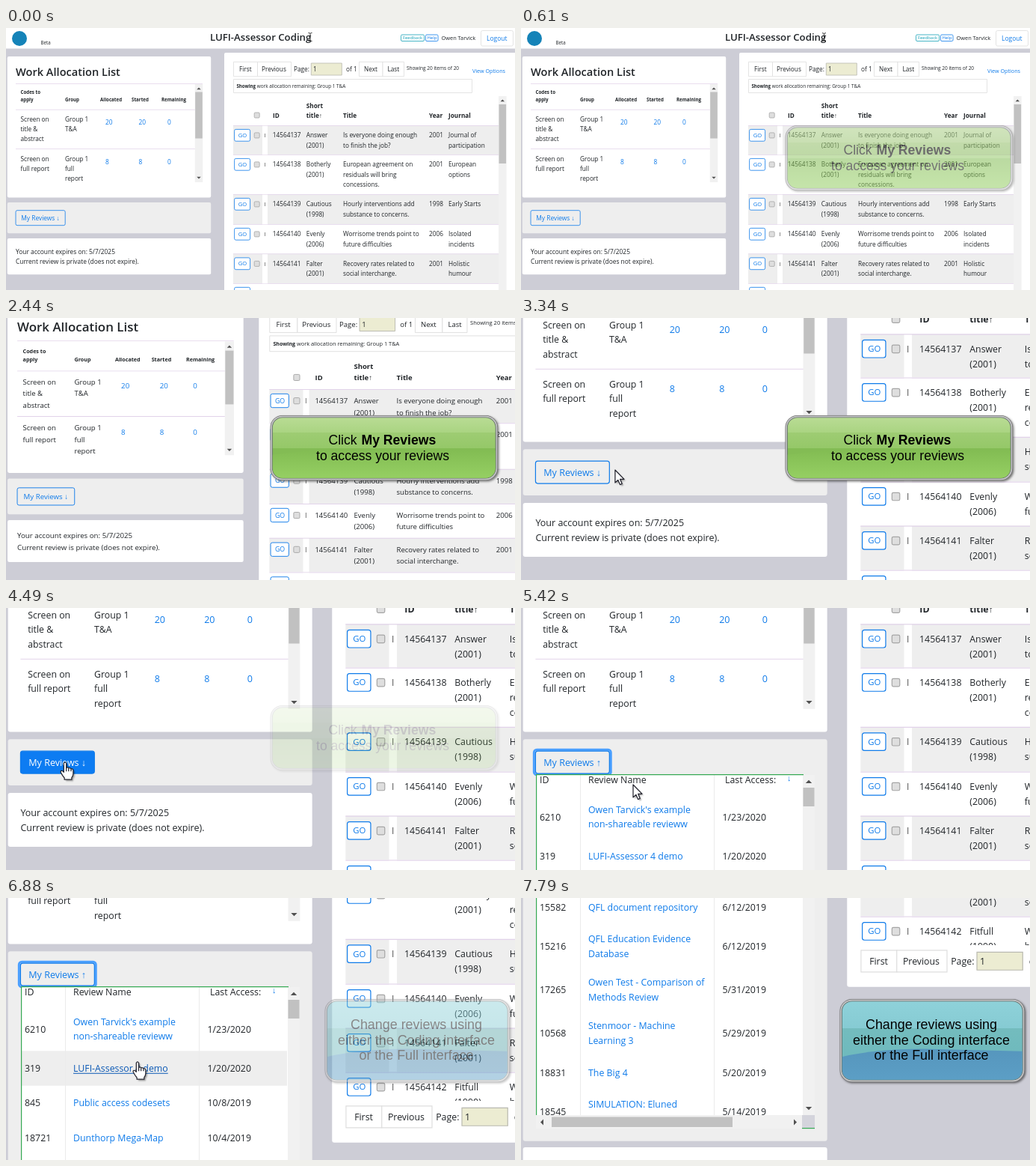
An HTML page with a canvas that plays this animation: 681x350 px, repeating every 8000 ms.

```html
<!DOCTYPE html>
<html lang="en">
<head>
<meta charset="utf-8">
<title>Opening the review list</title>
<style>
  html, body { margin: 0; width: 100%; height: 100%; overflow: hidden; background: #cdcdd6; }
  canvas { display: block; }
</style>
</head>
<body>
<canvas id="stage" width="681" height="350"></canvas>
<script>
const W = 681, H = 350, LOOP = 8000, ZOOM = 1.494, NOTCH = 104;
const INK = '#212529', BLUE = '#0f7bea', BACK = '#cdcdd6', PALE = '#eeeeee', LILAC = '#e2d3ea';
let ctx = document.getElementById('stage').getContext('2d');

const ramp = (t, a, b) => Math.min(1, Math.max(0, (t - a) / (b - a)));
const ease = (t, a, b) => { const p = ramp(t, a, b); return p * p * (3 - 2 * p); };

function text(str, x, y, size = 8.25, color = INK, weight = 400) {
  ctx.font = `${weight} ${size}px "Open Sans", sans-serif`;
  ctx.fillStyle = color;
  ctx.fillText(str, x, y + size * 0.36);
  return ctx.measureText(str).width;
}

function lines(list, x, y, step, size, color, weight) {
  list.forEach((s, i) => text(s, x, y + i * step, size, color, weight));
}

function box(x, y, w, h, fill, stroke, r = 0, lw = 0.8) {
  ctx.beginPath();
  ctx.roundRect(x, y, w, h, r);
  if (fill) { ctx.fillStyle = fill; ctx.fill(); }
  if (stroke) { ctx.strokeStyle = stroke; ctx.lineWidth = lw; ctx.stroke(); }
}

function clipped(x, y, w, h, draw, r = 0) {
  ctx.save();
  ctx.beginPath();
  ctx.roundRect(x, y, w, h, r);
  ctx.clip();
  draw();
  ctx.restore();
}

function triangle(x, y, r, angle, color = '#505050') {
  ctx.save();
  ctx.translate(x, y);
  ctx.rotate(angle);
  ctx.beginPath();
  ctx.moveTo(-r, r / 2);
  ctx.lineTo(r, r / 2);
  ctx.lineTo(0, -r / 2);
  ctx.fillStyle = color;
  ctx.fill();
  ctx.restore();
}

function scrollbar(x, y, w, h, thumbY, thumbH) {
  box(x, y, w, h, '#f1f1f1');
  box(x + 0.5, thumbY, w - 1, thumbH, '#c1c1c1');
  triangle(x + w / 2, y + w * 0.55, w * 0.26, 0);
  triangle(x + w / 2, y + h - w * 0.55, w * 0.26, Math.PI);
}

// ---- page ----

function header() {
  box(0, 0, W, 27.5, '#fff');
  ctx.beginPath();
  ctx.arc(18, 14, 10, 0, 7);
  ctx.fillStyle = '#1583b8';
  ctx.fill();
  text('Beta', 46.5, 20, 6.2);
  text('LUFI-Assessor Coding', 273, 12.5, 13.2, INK, 600);
  box(528.5, 9, 31, 8.5, '#fff', '#17a2b8', 1.5);
  text('Feedback', 531, 13.2, 5.9, '#17a2b8');
  box(561.5, 9, 16.5, 8.5, '#fff', BLUE, 1.5);
  text('Help', 563.5, 13.2, 5.9, BLUE);
  text('Owen Tarvick', 582.5, 13.5, 7.4);
  box(635.5, 3.5, 43, 20.5, '#fff', '#dddddd', 2);
  text('Logout', 643, 13.5, 8.5, BLUE);
}

function allocations() {
  box(1.8, 38, 272.4, 188.5, '#fff', null, 2);
  text('Work Allocation List', 13, 58.5, 14.6, INK, 600);
  box(13, 74, 250, 0.7, LILAC);
  lines(['Codes to', 'apply'], 19.5, 86, 10, 6.2, INK, 700);
  [['Group', 79], ['Allocated', 126], ['Started', 168], ['Remaining', 208]]
    .forEach(([s, x]) => text(s, x, 96, 6.2, INK, 700));
  box(13, 108.7, 240, 0.8, LILAC);
  box(13, 161, 240, 0.8, LILAC);
  const row = (y, code, group, count) => {
    lines(code, 19.5, y, 13.2);
    lines(group, 79, y, 13.2);
    [[count, 133], [count, 177.5], ['0', 216]].forEach(([s, x]) => text(s, x, y + 4.4, 8.4, BLUE));
  };
  row(121.9, ['Screen on', 'title &', 'abstract'], ['Group 1', 'T&A'], '20');
  row(174.8, ['Screen on', 'full report'], ['Group 1', 'full', 'report'], '8');
  scrollbar(252.7, 75, 10.6, 131, 85.5, 62);
}

function reviewsPanel(open, hover) {
  box(1.8, 233, 272.4, open ? 309 : 41.3, PALE, null, 2);
  if (open) box(11.6, 242.4, 68.9, 22.5, null, '#4ba0ff', 2.5, 2);
  box(13, 243.7, 66.2, 20, hover ? '#0d7cf2' : null, BLUE, 2);
  text('My Reviews ' + (open ? '↑' : '↓'), 20.3, 253.8, 8.4, hover ? '#fff' : BLUE);
}

function account(open) {
  const y = open ? 266.4 : 0;
  box(1.8, 281 + y, 272.4, 48.3, '#fff', null, 2);
  text('Your account expires on: 5/7/2025', 13, 299 + y, 8.38);
  text('Current review is private (does not expire).', 13, 312.2 + y, 8.38);
}

const papers = [
  [130, ['Answer', '(2001)'], ['Is everyone doing enough', 'to finish the job?'], '2001', ['Journal of', 'participation']],
  [169, ['Botherly', '(2001)'], ['European agreement on', 'residuals will bring', 'concessions.'], '2001', ['European', 'options']],
  [222, ['Cautious', '(1998)'], ['Hourly interventions add', 'substance to concerns.'], '1998', ['Early Starts']],
  [262, ['Evenly', '(2006)'], ['Worrisome trends point to', 'future difficulties'], '2006', ['Isolated', 'incidents']],
  [301.5, ['Falter', '(2001)'], ['Recovery rates related to', 'social interchange.'], '2001', ['Holistic', 'humour']],
  [341, ['Fitfull', '(1990)'], ['Weekly patterns of', 'household change.'], '1990', ['Modern', 'habits']],
  [381]
];

function checkbox(y) {
  box(332.2, y - 3.5, 7, 7, '#dedede', '#a5a5a5', 1.2);
}

function pager(y) {
  box(304.5, y - 9.7, 32, 19.4, '#fff', '#dedede');
  box(336.5, y - 9.7, 45, 19.4, '#fff', '#dedede');
  text('First', 312, y);
  text('Previous', 342, y);
  text('Page:', 385, y);
  box(408.3, y - 8, 41, 16, '#ececd2', '#b9b9b0');
  text('1', 411, y);
  text('of 1', 455, y);
  box(472.5, y - 9.7, 31.5, 19.4, '#fff', '#dedede');
  box(504, y - 9.7, 28.5, 19.4, '#fff', '#dedede');
  text('Next', 479, y);
  text('Last', 510.5, y);
  text('Showing 20 items of 20', 536, y - 1.5, 6.5);
}

function paperRow([top, name, title, year, journal], i) {
  const y = top + 13.4, h = papers[i + 1][0] - top;
  box(304, top, 355, h, i % 2 ? '#fff' : PALE);
  box(304, top, 355, 0.8, LILAC);
  box(343, top + 0.8, 7, h - 0.8, '#fff');
  box(305.6, y - 8, 21, 15.8, '#fff', BLUE, 2);
  text('GO', 310.7, y - 0.2, 7.6, BLUE);
  checkbox(y);
  text('I', 345.3, y, 8, '#555');
  text(String(14564137 + i), 356.8, y);
  lines(name, 401.8, y, 13.35);
  lines(title, 451, y, 13.35);
  text(year, 566, y);
  lines(journal, 592, y, 13.35);
}

function papersPanel() {
  box(292, 33, 400, 371, '#fff', null, 2);
  pager(55);
  text('View Options', 624, 57, 7.2, BLUE);
  box(304.5, 68.5, 319, 18, '#fff', '#dedede');
  const w = text('Showing', 308.5, 77.5, 6.1, INK, 700);
  text(' work allocation remaining: Group 1 T&A', 308.5 + w, 77.5, 6.4);
  clipped(304, 91, 366, 275.7, () => {
    checkbox(116.5);
    text('Short', 401.8, 104, 8.2, INK, 700);
    [['ID', 357], ['title↑', 401.8], ['Title', 451], ['Year', 566], ['Journal', 592]]
      .forEach(([s, x]) => text(s, x, 117, 8.2, INK, 700));
    papers.slice(0, -1).forEach(paperRow);
    scrollbar(659, 91, 10.6, 275.7, 102, 79);
  });
  pager(381);
}

// ---- review list, laid out in zoomed units ----

const reviews = [
  ['6210', ["Owen Tarvick's example", 'non-shareable revieww'], '1/23/2020'],
  ['319', ['LUFI-Assessor 4 demo'], '1/20/2020'],
  ['845', ['Public access codesets'], '10/8/2019'],
  ['18721', ['Dunthorp Mega-Map'], '10/4/2019'],
  ['16034', ['Rapid scoping of', 'school meals'], '7/8/2019'],
  ['15582', ['QFL document repository'], '6/12/2019'],
  ['15216', ['QFL Education Evidence', 'Database'], '6/12/2019'],
  ['17265', ['Owen Test - Comparison of', 'Methods Review'], '5/31/2019'],
  ['10568', ['Stenmoor - Machine', 'Learning 3'], '5/29/2019'],
  ['18831', ['The Big 4'], '5/20/2019'],
  ['18545', ['SIMULATION: Eluned', 'workload'], '5/14/2019'],
  ['17902', ['Pilot screening'], '5/13/2019']
];
let nextTop = 146;
const reviewRows = reviews.map(([id, name, date]) => {
  const top = nextTop, h = name.length > 1 ? 58.2 : 46.5;
  nextTop += h;
  return { id, name, date, top, h };
});

function reviewRow({ id, name, date, top, h }, hovered, onLink) {
  const y = top + h / 2, size = 12.35;
  if (hovered) box(21, top, 355, h, PALE);
  text(id, 25, y, size);
  text(date, 269.5, y, size);
  name.forEach((s, i) => {
    const ly = y + (i - (name.length - 1) / 2) * 19.7;
    const w = text(s, 90, ly, size, onLink ? '#0a58b5' : BLUE);
    if (onLink) box(90, ly + 6.3, w, 1, '#0a58b5');
  });
}

function reviewList(offset, hovered, onLink) {
  ctx.save();
  ctx.scale(1 / ZOOM, 1 / ZOOM);
  ctx.translate(0, NOTCH + H * (ZOOM - 1));
  clipped(20, 118, 373, 380, () => {
    box(20, 118, 358, 380, '#fff');
    ctx.save();
    ctx.translate(0, -offset);
    [['ID', 25], ['Review Name', 90], ['Last Access:', 273]].forEach(([s, x]) => text(s, x, 126, 12.35));
    text('↓', 356, 123, 11, BLUE);
    reviewRows.forEach(r => reviewRow(r, r === hovered, onLink && r === hovered));
    box(79, 118, 1, 700, '#ebebeb');
    box(258, 118, 1, 700, '#ebebeb');
    ctx.restore();
    scrollbar(377, 119, 16, 379, 136 + offset * 0.063, 25);
  });
  box(20, 118, 1.2, 380, '#35a853');
  box(20, 118, 358, 1.2, '#35a853');
  box(20, 498, 357, 18, '#f1f1f1');
  box(41, 500.5, 242, 13.5, '#c1c1c1');
  triangle(28, 507.5, 4, -Math.PI / 2);
  triangle(367, 507.5, 4, Math.PI / 2);
  box(376, 498, 17, 17, '#d4d4dc');
  box(376, 515, 17, 1.2, '#35a853');
  ctx.restore();
}

// ---- pointer ----

const zoomed = (t, x, y) => [t, x / ZOOM, H - (H - y) / ZOOM];
const path = [
  [0, 407, 12], [500, 407, 12], [1000, 400, 13], [1450, 341, 15], [1810, 281, 14], [2500, 281, 14],
  zoomed(3340, 126, 203), zoomed(3560, 110, 210), zoomed(3830, 84, 213), zoomed(4250, 79, 206),
  zoomed(4800, 79, 206), zoomed(5420, 150, 236), zoomed(5600, 150, 236), zoomed(6060, 194, 196),
  zoomed(6520, 194, 196), zoomed(6960, 172, 224), zoomed(7460, 172, 224), zoomed(7600, 520, 190),
  zoomed(LOOP, 520, 190)
];

function pointerAt(t) {
  const i = path.findIndex(k => k[0] > t);
  const [a, b] = [path[i - 1], path[i]], p = ramp(t, a[0], b[0]);
  return { x: a[1] + (b[1] - a[1]) * p, y: a[2] + (b[2] - a[2]) * p };
}

const arrow = new Path2D('M0 0V16.5L3.8 13L6.3 19L9 17.9L6.5 12H11.7Z');
const hand = new Path2D('M-1.6 1.2Q0-1.4 1.6 1.2V7.2Q3.6 6 4.6 7.8Q6.8 6.8 7.8 8.8Q10 8 10.6 10.4V15Q10.4 18 8.6 20V22.5H-.8V20.4Q-3 18-5.6 13.2Q-6 10.2-3.4 11.2L-1.6 13Z');
const fingers = new Path2D('M1.6 7V12M4.6 8V12M7.8 9V12');

function pointer({ x, y }, kind) {
  ctx.save();
  ctx.translate(x, y);
  ctx.lineJoin = 'round';
  if (kind === 'beam') {
    ctx.strokeStyle = '#222';
    ctx.lineWidth = 0.9;
    ctx.stroke(new Path2D('M-2.5-5.5Q0-5.5 0-4.5Q0-5.5 2.5-5.5M0-4.5V4.5M-2.5 5.5Q0 5.5 0 4.5Q0 5.5 2.5 5.5'));
  } else {
    ctx.scale(1.03 / ZOOM, 1.03 / ZOOM);
    const shape = kind === 'hand' ? hand : arrow;
    ctx.fillStyle = '#fff';
    ctx.strokeStyle = '#23232d';
    ctx.lineWidth = 1.2;
    ctx.shadowColor = 'rgba(0,0,0,.35)';
    ctx.shadowBlur = 2;
    ctx.shadowOffsetX = ctx.shadowOffsetY = 2;
    ctx.fill(shape);
    ctx.shadowColor = 'transparent';
    ctx.stroke(shape);
    if (kind === 'hand') ctx.stroke(fingers);
  }
  ctx.restore();
}

// ---- callouts, drawn once so that each fades as a single layer ----

function layer(paint) {
  const page = ctx, canvas = document.createElement('canvas');
  canvas.width = W;
  canvas.height = H;
  ctx = canvas.getContext('2d');
  paint();
  ctx = page;
  return canvas;
}

function shade(top, bottom, stops) {
  const g = ctx.createLinearGradient(0, top, 0, bottom);
  stops.forEach(([p, c]) => g.addColorStop(p, c));
  return g;
}

// The lowest band has a crest: it starts lower at the left edge.
function bubble(x, y, w, h, stops, wave, low) {
  ctx.shadowColor = 'rgba(0,0,0,.5)';
  ctx.shadowBlur = 3;
  ctx.shadowOffsetX = ctx.shadowOffsetY = 1.5;
  box(x, y, w, h, '#777', null, 16);
  ctx.shadowColor = 'transparent';
  box(x + 0.8, y + 0.8, w - 1.6, h - 1.6, '#c6c6c8', null, 15.5);
  box(x + 2.4, y + 2.4, w - 4.8, h - 4.8, '#5f6b66', null, 14);
  clipped(x + 3.3, y + 3.3, w - 6.6, h - 6.6, () => {
    box(x, y, w, h, shade(y, y + h, stops));
    const crest = y + h * wave;
    ctx.beginPath();
    ctx.moveTo(x, crest + h * 0.1);
    ctx.quadraticCurveTo(x + w * 0.2, crest, x + w * 0.45, crest);
    ctx.lineTo(x + w, crest + h * 0.03);
    ctx.lineTo(x + w, y + h);
    ctx.lineTo(x, y + h);
    ctx.fillStyle = shade(crest, y + h, low);
    ctx.fill();
  }, 13);
  ctx.fillStyle = '#000';
}

function label(str, x, y, size, weight = 400, align = 'center') {
  ctx.textAlign = align;
  ctx.font = `${weight} ${size}px "Liberation Sans", Arial, sans-serif`;
  ctx.fillText(str, x, y + size * 0.36);
}

const clickHint = layer(() => {
  bubble(353.5, 130, 304.5, 87,
    [[0, '#bbdd97'], [0.26, '#aad482'], [0.26, '#9ecc73'], [0.51, '#95c868'], [0.51, '#83bc54'], [1, '#83bc54']],
    0.51, [[0, '#81bb52'], [1, '#97d164']]);
  label('Click ', 431.5, 162.5, 17.6, 400, 'left');
  label('My Reviews', 475.5, 162.5, 17.6, 700, 'left');
  label('to access your reviews', 504, 183.5, 17.6);
});

const changeHint = layer(() => {
  bubble(426.5, 135, 247.5, 111,
    [[0, '#8fd2da'], [0.35, '#86cbd3'], [0.35, '#73bcbe'], [1, '#6bb8bc']],
    0.6, [[0, '#5696bd'], [1, '#5c9fc6']]);
  ['Change reviews using', 'either the Coding interface', 'or the Full interface']
    .forEach((s, i) => label(s, 549, 169 + i * 20.3, 17.9));
});

function show(image, alpha) {
  ctx.globalAlpha = alpha;
  ctx.drawImage(image, 0, 0);
  ctx.globalAlpha = 1;
}

// ---- frame ----

function draw(t) {
  const scale = 1 + (ZOOM - 1) * ramp(t, 2120, 3120);
  const scroll = NOTCH * (ease(t, 5590, 5780) + ease(t, 7540, 7660) + ease(t, 7660, 7780));
  const listScroll = 205 * ease(t, 7270, 7500);
  const open = t >= 4800;
  const p = pointerAt(t);

  const listX = p.x * ZOOM;
  const listY = H - (H - p.y) * ZOOM + scroll - NOTCH + listScroll;
  const inList = open && listX > 20 && listX < 376;
  const hovered = inList && reviewRows.find(r => listY >= r.top && listY < r.top + r.h);
  const onLink = hovered && listX > 90 && listX < 226;
  const pageY = p.y + scroll / ZOOM;
  const onButton = p.x > 13 && p.x < 79.2 && pageY > 243.7 && pageY < 263.7;

  ctx.setTransform(1, 0, 0, 1, 0, 0);
  box(0, 0, W, H, BACK);
  ctx.setTransform(scale, 0, 0, scale, 0, H * (1 - scale));
  ctx.save();
  ctx.translate(0, -scroll / ZOOM);
  header();
  allocations();
  reviewsPanel(open, onButton);
  account(open);
  papersPanel();
  if (open) reviewList(listScroll, hovered, onLink);
  ctx.restore();
  pointer(p, t < 2500 ? 'beam' : onButton || onLink ? 'hand' : 'arrow');
  ctx.setTransform(1, 0, 0, 1, 0, 0);
  show(clickHint, ramp(t, 70, 1070) * (1 - ramp(t, 3650, 4650)));
  show(changeHint, ramp(t, 6420, 7420));
}

const start = performance.now();
function tick() {
  draw((performance.now() - start) % LOOP);
  requestAnimationFrame(tick);
}
tick();
</script>
</body>
</html>
```
